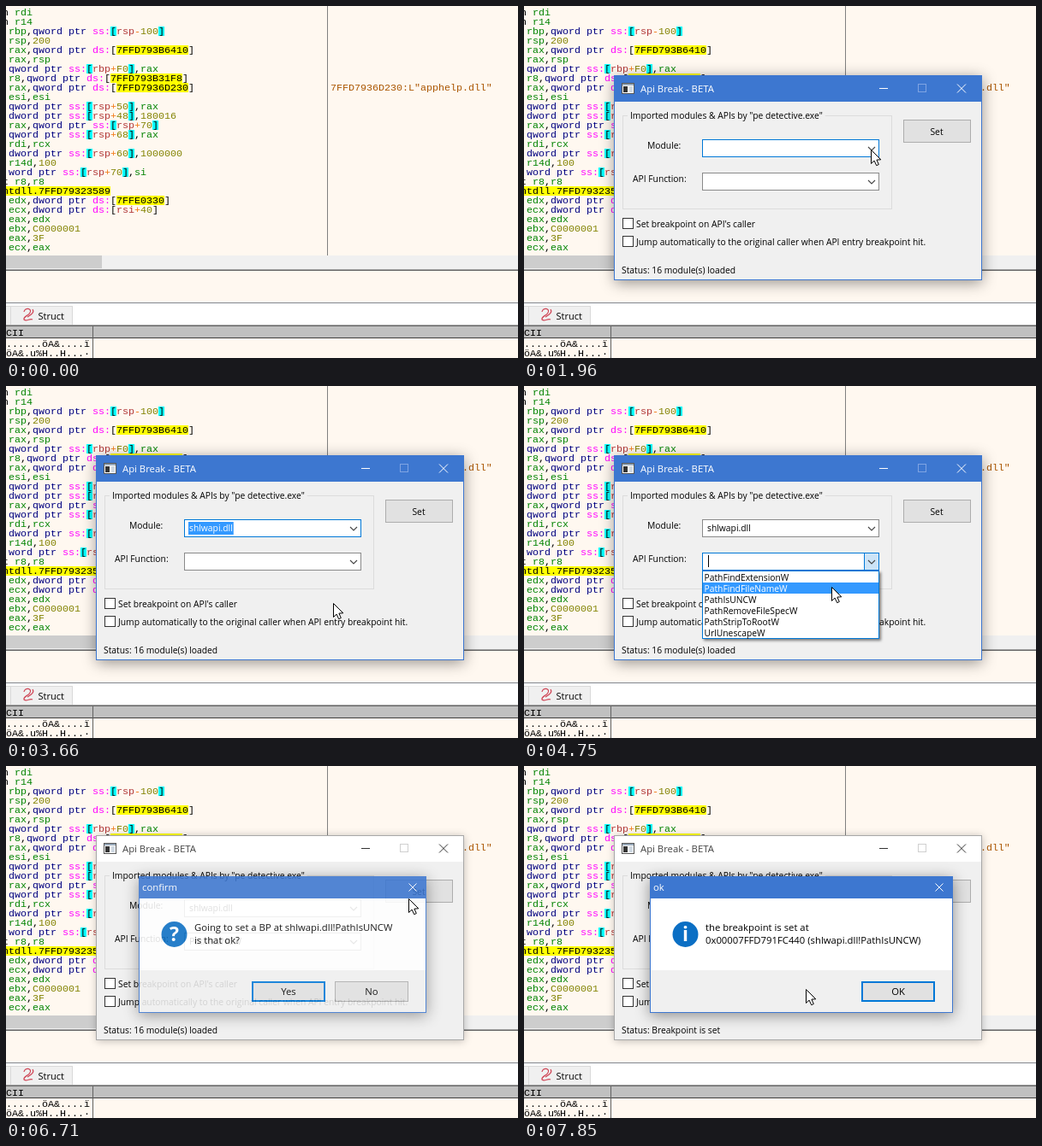
Animation of 598x412 px, one loop 7.99 s. Source, as an HTML page with a canvas:

```html
<!DOCTYPE html>
<html lang="en">
<head>
<meta charset="utf-8">
<title>Setting an API breakpoint</title>
<style>
  html, body { margin: 0; width: 100%; height: 100%; overflow: hidden; background: #fff8f0; }
  canvas { display: block; width: 598px; height: 412px; }
</style>
</head>
<body>
<canvas id="stage" width="598" height="412"></canvas>
<script>
const ctx = document.getElementById('stage').getContext('2d');
const LOOP = 7990;

const MONO = '11.667px "Liberation Mono", monospace';
const FORM = '10.3px "Open Sans", sans-serif';
const SYSTEM = '11.3px "Open Sans", sans-serif';
const PAPER = '#fff8f0', FACE = '#f0f0f0', ACCENT = '#3d77d0', FOCUS = '#0078d7', MARK = '#3399ff';
const EDGE = '#a0a0a0', DARK_EDGE = '#696969';

// Moments of the story, in ms
const T = {
  open: 100, loaded: 1180, modulesDrop: 2040, modulePicked: 3450,
  apisDrop: 4260, apiPicked: 5390, setClick: 6480, confirm: 6560,
  yes: 7450, done: 7560
};

const MODULES = ['advapi32.dll', 'combase.dll', 'comctl32.dll', 'comdlg32.dll', 'gdi32.dll',
  'gdi32full.dll', 'kernel32.dll', 'kernelbase.dll', 'ntdll.dll', 'ole32.dll', 'oledlg.dll',
  'shell32.dll', 'shlwapi.dll', 'user32.dll', 'windows.storage.dll', 'winspool.drv'];
const APIS = ['PathFindExtensionW', 'PathFindFileNameW', 'PathIsUNCW',
  'PathRemoveFileSpecW', 'PathStripToRootW', 'UrlUnescapeW'];

// A leading "<" moves a line one character to the left
const CODE = ['<h rdi', '<h r14', 'rbp,qword ptr ss:[rsp-100]', 'rsp,200',
  'rax,qword ptr ds:[7FFD793B6410]', 'rax,rsp', 'qword ptr ss:[rbp+F0],rax',
  'r8,qword ptr ds:[7FFD793B31F8]', 'rax,qword ptr ds:[7FFD7936D230]', 'esi,esi',
  'qword ptr ss:[rsp+50],rax', 'dword ptr ss:[rsp+48],180016', 'rax,qword ptr ss:[rsp+70]',
  'qword ptr ss:[rsp+68],rax', 'rdi,rcx', 'dword ptr ss:[rsp+60],1000000', 'r14d,100',
  'word ptr ss:[rsp+70],si', '<t r8,r8', '<ntdll.7FFD79323589', 'edx,dword ptr ds:[7FFE0330]',
  'ecx,dword ptr ds:[rsi+40]', 'eax,edx', 'ebx,C0000001', 'eax,3F', 'ecx,eax'];
const TOKEN = /[qd]?word ptr|[sd]s:|ntdll\.\w+|7FF\w+|[\[\]]|r\w+|e[abcds]\w+|si|[+-]|[0-9A-F]+|./g;

// Time, x and y of the pointer
const CURSOR_PATH = [
  [0, -30, 60], [70, -14, 62], [430, 190, 170], [790, 347, 247], [1050, 350, 246],
  [1700, 402, 180], [1950, 405, 168], [2150, 405, 169], [2540, 355, 268], [2950, 350, 325],
  [3270, 345, 338], [3450, 345, 338], [3660, 382, 254], [3960, 402, 214], [4150, 406, 206],
  [4350, 406, 206], [4700, 360, 234], [5020, 345, 248], [5390, 345, 248], [5960, 450, 172],
  [6160, 464, 160], [6400, 470, 155], [6900, 470, 155], [7330, 329, 261], [LOOP, 329, 261]
];

function rect(x, y, w, h, fill, stroke, line = 1) {
  if (fill) { ctx.fillStyle = fill; ctx.fillRect(x, y, w, h); }
  if (stroke) {
    ctx.strokeStyle = stroke;
    ctx.lineWidth = line;
    ctx.strokeRect(x + line / 2, y + line / 2, w - line, h - line);
  }
}

function text(str, x, y, font, color = '#000', align = 'left') {
  ctx.font = font;
  ctx.fillStyle = color;
  ctx.textAlign = align;
  ctx.fillText(str, x, y);
}

function stroke(points, color, width = 1) {
  ctx.strokeStyle = color;
  ctx.lineWidth = width;
  ctx.beginPath();
  points.forEach(([x, y]) => ctx.lineTo(x, y));
  ctx.stroke();
}

function cross(x, y, r, color) {
  stroke([[x - r, y - r], [x + r, y + r]], color);
  stroke([[x - r, y + r], [x + r, y - r]], color);
}

const easeOut = p => 1 - (1 - p) ** 2;
const fadeIn = (t, start, span = 230) => easeOut(Math.min(1, Math.max(0, (t - start) / span)));

function cursorAt(t) {
  const i = Math.max(1, CURSOR_PATH.findIndex(k => k[0] >= t));
  const [t0, x0, y0] = CURSOR_PATH[i - 1], [t1, x1, y1] = CURSOR_PATH[i];
  const p = (t - t0) / (t1 - t0), e = p * p * (3 - 2 * p);
  return { x: x0 + (x1 - x0) * e, y: y0 + (y1 - y0) * e };
}

function tokenStyle(token, inside, stack) {
  if (/ptr/.test(token)) return ['#000080'];
  if (/^[sd]s:/.test(token)) return ['#ff00ff'];
  if (/^(ntdll|7FF)/.test(token)) return ['#000', '#ffff00'];
  if (/[\[\]]/.test(token)) return ['#000', stack && '#00ffff'];
  if (/^(r|e|si)/.test(token)) return [inside ? '#b03434' : '#008300'];
  if (/[+-]/.test(token)) return ['#f27711'];
  if (/[0-9A-F]/.test(token)) return ['#828200'];
  return ['#000'];
}

function codeLine(line, top) {
  let x = line[0] === '<' ? -4 : 3, inside = false, stack = false;
  for (const token of line.replace('<', '').match(TOKEN)) {
    if (token.endsWith('s:')) stack = token === 'ss:';
    if (token === '[') inside = true;
    const [color, back] = tokenStyle(token, inside, stack);
    if (back) rect(x, top, token.length * 7, 11, back);
    text(token, x, top + 9, MONO, color);
    if (token === ']') inside = false;
    x += token.length * 7;
  }
}

function structIcon() {
  ctx.strokeStyle = '#cf4656';
  ctx.lineWidth = 1.2;
  ctx.beginPath();
  ctx.moveTo(21, 358);
  ctx.bezierCurveTo(22, 352, 31, 354, 28, 359);
  ctx.bezierCurveTo(26, 363, 20, 363, 21, 367);
  ctx.bezierCurveTo(24, 370, 28, 365, 31, 367);
  ctx.moveTo(31, 355);
  ctx.bezierCurveTo(34, 359, 28, 362, 25, 364);
  ctx.stroke();
}

function debuggerPanes() {
  rect(0, 0, 598, 412, PAPER);
  CODE.forEach((line, i) => codeLine(line, 2 + 11 * i));
  text('7FFD7936D230:L"apphelp.dll"', 379, 99, MONO, '#aa5500');
  rect(375, 0, 1, 292, '#808080');

  rect(0, 292, 598, 16, FACE);
  rect(0, 292, 112, 15, '#cdcdcd');
  rect(0, 308, 598, 1, EDGE);
  rect(0, 309, 598, 1, DARK_EDGE);

  rect(0, 347, 598, 28, '#fff');
  rect(0, 347, 598, 1, '#828790');
  rect(-2, 351, 8, 23, FACE, '#d9d9d9');
  rect(5, 351, 73, 23, FACE, '#d9d9d9');
  structIcon();
  text('Struct', 37.5, 367, '11px "Open Sans", sans-serif');

  rect(0, 373, 598, 1, EDGE);
  rect(0, 374, 598, 1, DARK_EDGE);
  rect(0, 375, 598, 13, '#c0c0c0');
  rect(0, 388, 598, 1, '#404040');
  rect(101, 375, 1, 37, '#606060');
  text('CII', 0, 386, MONO);
  text('......öA&....ï', 0, 399, MONO);
  text('öA&.u%H..H...·', 0, 410, MONO);
}

function frame(x, y, w, h, active) {
  ctx.save();
  ctx.shadowColor = active ? 'rgba(0,0,0,.42)' : 'rgba(0,0,0,.25)';
  ctx.shadowBlur = active ? 16 : 9;
  ctx.shadowOffsetY = active ? 3 : 1;
  rect(x, y, w, h, FACE);
  ctx.restore();
}

function combo(y, value, { focus, open, selected }) {
  rect(208, y, 207, 21, '#fff', focus ? FOCUS : '#8a8a8a');
  if (open) {
    rect(397, y, 18, 21, '#cce4f7', FOCUS);
    if (!value) rect(215, y + 3, 1, 14, '#000');
  }
  stroke([[402, y + 9], [406, y + 13], [410, y + 9]], '#444', 1.1);
  if (!value) return;
  ctx.font = FORM;
  if (selected) rect(213, y + 3, ctx.measureText(value).width + 2, 15, MARK);
  text(value, 214, y + 14, FORM, selected ? '#fff' : '#000');
}

function dropList(y, items, cursor) {
  const h = items.length * 13;
  ctx.save();
  ctx.shadowColor = 'rgba(0,0,0,.5)';
  ctx.shadowBlur = 3;
  ctx.shadowOffsetX = ctx.shadowOffsetY = 2;
  rect(208, y, 207, h + 2, '#fff');
  ctx.restore();
  rect(208, y, 207, h + 2, null, FOCUS);
  items.forEach((item, i) => {
    const top = y + 1 + i * 13;
    const hot = cursor.y >= top && cursor.y < top + 13;
    if (hot) rect(209, top, 205, 13, MARK);
    text(item, 210.5, top + 11, FORM, hot ? '#fff' : '#000');
  });
}

function setButton(t, cursor) {
  const hover = t < T.confirm && cursor.x > 443 && cursor.x < 522 && cursor.y > 133 && cursor.y < 160;
  const pressed = hover && t > T.setClick;
  if (t < T.loaded) rect(443, 133, 79, 27, '#cccccc', '#bfbfbf');
  else if (hover) rect(443, 133, 79, 27, pressed ? '#cce4f7' : '#e5f1fb', FOCUS);
  else rect(443, 133, 79, 27, '#e1e1e1', '#adadad');
  text('Set', 482, 151, FORM, t < T.loaded ? '#838383' : '#000', 'center');
}

function statusText(t) {
  if (t < T.loaded) return 'Loading modules';
  return t < T.yes + 40 ? '16 module(s) loaded' : 'Breakpoint is set';
}

function mainWindow(t, cursor) {
  const active = t < T.confirm;
  const ink = active ? '#fff' : '#333';
  frame(106, 81, 429, 240, active);
  rect(106, 81, 429, 31, active ? ACCENT : '#fff');
  rect(105, 81, 430, 240, null, active ? ACCENT : '#a8a8a8');

  rect(114, 90, 15, 13, '#fff', '#555');
  rect(115, 91, 13, 2, '#9ab');
  rect(116, 94, 5, 7, '#333');
  rect(123, 94, 4, 7, '#cfd8e2');
  text('Api Break - BETA', 136, 101, SYSTEM, active ? '#fff' : '#444');
  rect(415, 96, 10, 1, ink);
  rect(460, 91, 10, 10, null, active ? '#7fa4e2' : '#d0d0d0');
  cross(511, 96.5, 5, ink);

  rect(115, 128, 315, 110, null, '#dcdcdc');
  const caption = t < T.loaded ? 'Imported Modules & APIs' : 'Imported modules & APIs by "pe detective.exe"';
  ctx.font = FORM;
  rect(121, 126, ctx.measureText(caption).width + 6, 6, FACE);
  text(caption, 124, 132, FORM);
  text('Module:', 144, 167, FORM);
  text('API Function:', 127, 206, FORM);

  const modulesOpen = t >= T.modulesDrop && t < T.modulePicked;
  const apisOpen = t >= T.apisDrop && t < T.apiPicked;
  combo(156, t < T.modulePicked ? '' : 'shlwapi.dll',
    { focus: t < T.apisDrop, open: modulesOpen, selected: t < T.apisDrop });
  combo(195, t < T.apiPicked ? '' : 'PathIsUNCW',
    { focus: t >= T.apisDrop && t < T.setClick, open: apisOpen, selected: t < T.setClick });
  setButton(t, cursor);

  rect(115, 248, 13, 13, '#fff', '#333');
  rect(115, 269, 13, 13, '#fff', '#333');
  text("Set breakpoint on API's caller", 131, 259, FORM);
  text('Jump automatically to the original caller when API entry breakpoint hit.', 131, 280, FORM);
  text('Status: ' + statusText(t), 114, 313, FORM);

  if (modulesOpen) dropList(177, MODULES, cursor);
  if (apisOpen) dropList(216, APIS, cursor);
}

function dialogButton(x, label, isDefault) {
  rect(x, 252, 86, 24, '#e1e1e1', isDefault ? FOCUS : '#adadad', isDefault ? 2 : 1);
  text(label, x + 43, 268, SYSTEM, '#000', 'center');
}

function dialog({ x, w, title, symbol, lines, buttons }) {
  frame(x, 129, w, 160, true);
  rect(x, 129, w, 110, '#fff');
  rect(x, 129, w, 26, ACCENT);
  rect(x, 129, w, 160, null, ACCENT);
  text(title, x + 4, 146, SYSTEM, '#fff');
  cross(x + w - 16, 142, 4.5, '#fff');

  ctx.fillStyle = '#0b6fc4';
  ctx.beginPath();
  ctx.arc(x + 41.5, 197, 15, 0, Math.PI * 2);
  ctx.fill();
  text(symbol, x + 41.5, 205, 'bold 23px "Open Sans", sans-serif', '#fff', 'center');

  lines.forEach((line, i) => text(line, x + 65, 193 + 15 * i, SYSTEM));
  buttons.forEach(([bx, label], i) => dialogButton(bx, label, i === 0));
}

const CONFIRM = {
  x: 155, w: 336, title: 'confirm', symbol: '?',
  lines: ['Going to set a BP at shlwapi.dll!PathIsUNCW', 'is that ok?'],
  buttons: [[287, 'Yes'], [384, 'No']]
};
const DONE = {
  x: 147, w: 354, title: 'ok', symbol: 'i',
  lines: ['the breakpoint is set at', '0x00007FFD791FC440 (shlwapi.dll!PathIsUNCW)'],
  buttons: [[394, 'OK']]
};

// Blends the painted layer with what was below it, as one picture
const screen = ctx.canvas, below = document.createElement('canvas');
below.width = screen.width;
below.height = screen.height;
function faded(alpha, paint) {
  if (alpha <= 0) return;
  if (alpha >= 1) return paint();
  below.getContext('2d').drawImage(screen, 0, 0);
  paint();
  ctx.save();
  ctx.globalAlpha = 1 - alpha;
  ctx.drawImage(below, 0, 0);
  ctx.restore();
}

function pointer({ x, y }) {
  ctx.save();
  ctx.translate(Math.round(x) + 0.5, Math.round(y) + 0.5);
  ctx.beginPath();
  [[0, 0], [0, 16], [3.6, 12.6], [6.2, 18.2], [8.8, 17], [6.4, 11.6], [11.3, 11.3]]
    .forEach(([px, py]) => ctx.lineTo(px, py));
  ctx.closePath();
  ctx.fillStyle = '#fff';
  ctx.fill();
  ctx.strokeStyle = '#000';
  ctx.lineWidth = 1;
  ctx.stroke();
  ctx.restore();
}

function draw(t) {
  const cursor = cursorAt(t);
  const opened = fadeIn(t, T.open);
  debuggerPanes();
  faded(opened, () => {
    const s = 0.92 + 0.08 * opened;
    ctx.save();
    ctx.translate(320, 201);
    ctx.scale(s, s);
    ctx.translate(-320, -201);
    mainWindow(t, cursor);
    ctx.restore();
  });
  faded(fadeIn(t, T.confirm) - fadeIn(t, T.yes, 150), () => dialog(CONFIRM));
  faded(fadeIn(t, T.done), () => dialog(DONE));
  pointer(cursor);
}

function tick() {
  draw(performance.now() % LOOP);
  requestAnimationFrame(tick);
}
tick();
</script>
</body>
</html>
```
